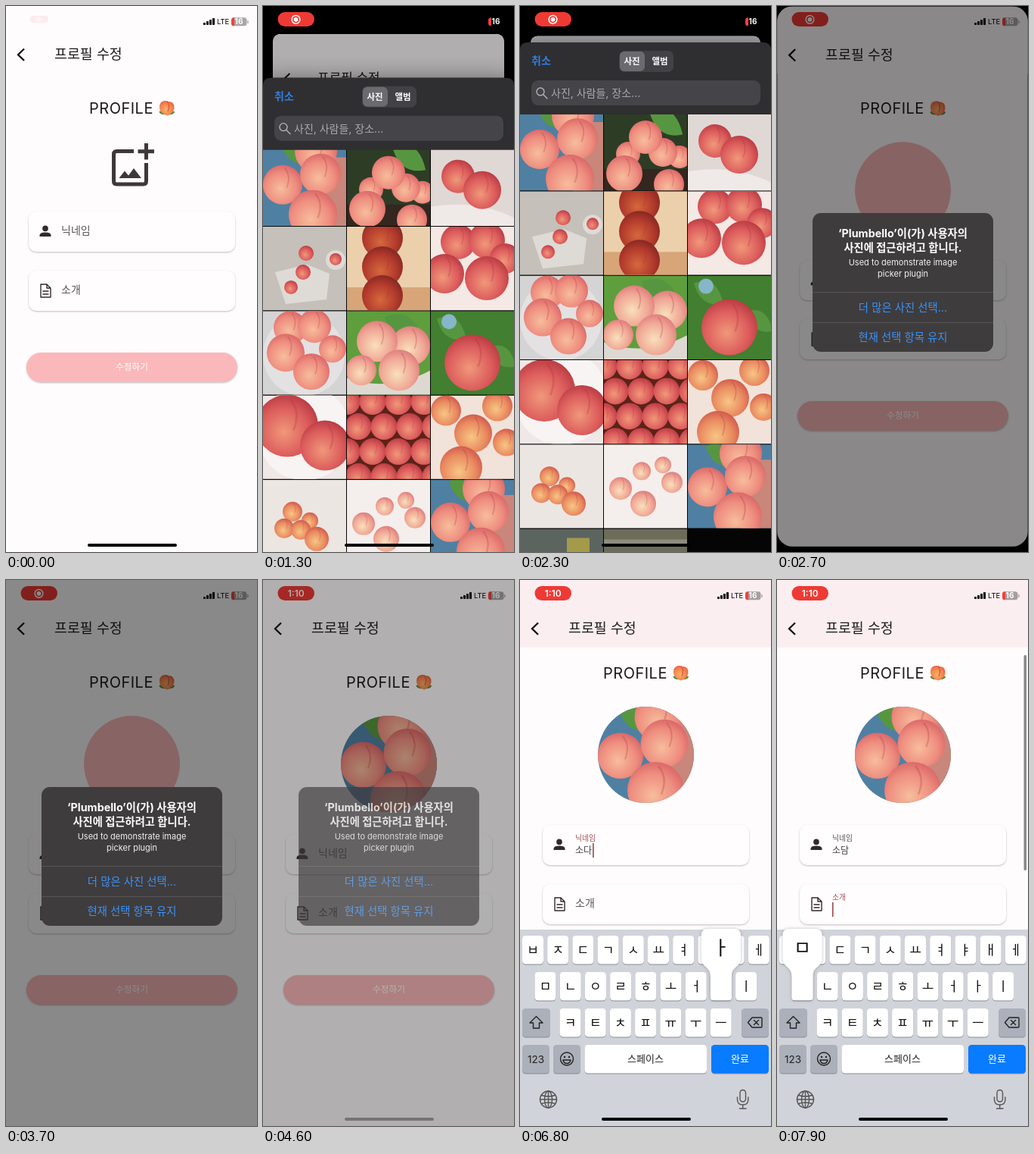
An HTML page that plays this animation: 332x720 px, repeating every 8000 ms.

```html
<!DOCTYPE html>
<html lang="ko">
<head>
<meta charset="utf-8">
<title>프로필 수정</title>
<style>
  html, body { margin: 0; width: 100%; height: 100%; overflow: hidden; background: #000; }
  svg { display: block; font-family: Inter, "Noto Sans CJK KR", "Noto Sans CJK", sans-serif; }
  .field { filter: drop-shadow(0 1px 1px rgba(0, 0, 0, .25)); }
  .mid { text-anchor: middle; }
  .line { fill: none; stroke: #222; stroke-width: 1.4; stroke-linecap: round; stroke-linejoin: round; }
</style>
</head>
<body>
<svg id="stage" width="100%" height="100%" viewBox="0 0 332 720"></svg>
<script>
const LOOP = 8000;
const $ = id => document.getElementById(id);
const range = n => [...Array(n).keys()];
const set = (id, attrs) => { for (const k in attrs) $(id).setAttribute(k, attrs[k]); };
const show = (id, v) => set(id, { opacity: Number(v) });
const ramp = (t, a, b) => Math.min(1, Math.max(0, (t - a) / (b - a)));
const ease = x => x * x * (3 - 2 * x);
const mix = (a, b, p) => a + (b - a) * p;
// critically damped spring from 0 to 1
const spring = (t, start) => {
  const w = Math.max(0, t - start) * .018;
  return 1 - (1 + w) * Math.exp(-w);
};

const rect = (x, y, w, h, fill, r = 0, more = '') =>
  `<rect x="${x}" y="${y}" width="${w}" height="${h}" rx="${r}" fill="${fill}" ${more}/>`;
const text = (s, x, y, size, fill, more = '') =>
  `<text x="${x}" y="${y}" font-size="${size}" fill="${fill}" ${more}>${s}</text>`;
const mid = (s, x, y, size, fill, more = '') => text(s, x, y, size, fill, 'class="mid" ' + more);
const path = (d, more = 'class="line"') => `<path d="${d}" ${more}/>`;
const disc = (x, y, r, fill, more = '') => `<circle cx="${x}" cy="${y}" r="${r}" fill="${fill}" ${more}/>`;
const gradient = (id, light, main, edge) => `<radialGradient id="${id}" cx=".45" cy=".6" r=".66">
  <stop stop-color="${light}"/><stop offset=".6" stop-color="${main}"/><stop offset="1" stop-color="${edge}"/></radialGradient>`;

// ---- photo grid ----
const peach = (kind, [x, y, r]) => disc(x, y, r, `url(#${kind})`) +
  path(`M${x + r * .1} ${y - r * .85}q${r * .35} ${r * .4} ${r * .1} ${r}`,
    `fill="none" stroke="#a52f3a" stroke-opacity=".25" stroke-width="${r * .07}"`);
const photo = (back, kind, peaches, extra = '') =>
  rect(0, 0, 111, 111, back) + extra + peaches.map(p => peach(kind, p)).join('');
const leaf = (x, y, s) => path(`M${x} ${y}q${s} ${-s * .4} ${s * 1.3} ${s * .9}q${-s} ${s * .2} ${-s * 1.3} ${-s * .9}`, 'fill="#579640"');

const photos = [
  photo('#4f80a2', 'pink', [[70, 12, 28], [26, 56, 26], [76, 42, 27], [66, 95, 32]],
    rect(70, 20, 41, 91, '#c9867a') + leaf(24, 2, 28)),
  photo('#2d3d25', 'pink', [[32, 62, 16], [100, 66, 15], [78, 60, 19], [55, 40, 22], [27, 88, 24], [86, 102, 20]],
    rect(0, 82, 111, 29, '#33271f') + leaf(60, 6, 34)),
  photo('#e0d8d5', 'red', [[36, 45, 22], [68, 63, 25]], path('M0 85Q60 75 111 100V111H0Z', 'fill="#efe9e8"')),
  photo('#c5c0b9', 'red', [[57, 35, 10], [53, 60, 10], [37, 80, 9], [96, 43, 8]],
    path('M16 60L58 50L88 62L84 96L30 102Z', 'fill="#dedbd6"') + disc(96, 44, 13, '#dedbd7')),
  photo('#ecd0ac', 'deep', range(3).map(i => [47, 15 + 38 * i, 27]), rect(0, 80, 111, 31, '#d8a578')),
  photo('#f4e9e5', 'red', [[36, 20, 23], [74, 18, 24], [98, 42, 20], [18, 62, 26], [74, 68, 29]]),
  photo('#d5d4d5', 'pink', [[36, 22, 22], [68, 20, 22], [92, 50, 18], [30, 55, 25], [64, 80, 24]], disc(54, 58, 54, '#e3e1e2')),
  photo('#5f9e3c', 'pale', [[84, 46, 26], [40, 40, 27], [19, 78, 20], [69, 78, 27]],
    path('M0 88Q55 108 111 78V111H0Z', 'fill="#ddd9d2"') + leaf(50, 8, 40)),
  photo('#427f30', 'red', [[55, 68, 37]], leaf(8, 10, 30) + leaf(76, 48, 28) + disc(24, 14, 10, '#85b7c9')),
  photo('#efe8e7', 'red', [[32, 40, 41], [82, 66, 33]], disc(55, 50, 62, '#f8f4f3')),
  photo('#5b2318', 'red', range(16).map(i => [(i % 4) * 34 + (i >> 2) % 2 * 15, (i >> 2) * 33 + 8, 17.5])),
  photo('#f1e3da', 'gold', [[20, 20, 20], [88, 14, 20], [100, 62, 18], [56, 50, 25], [40, 95, 28]]),
  photo('#ece6e2', 'gold', [[39, 42, 13], [28, 64, 13], [62, 54, 11], [50, 66, 13], [71, 78, 16]]),
  photo('#f4efec', 'pale', [[78, 27, 11], [90, 50, 14], [50, 35, 12], [22, 58, 15], [52, 78, 17]])
];
photos.push(photos[0],
  photo('#5c6460', 'gold', [], rect(62, 12, 30, 30, '#a39a4a')),
  photo('#6d6c58', 'gold', [], rect(0, 14, 111, 9, '#8f8d80')));
const cells = photos.map((p, i) =>
  `<svg x="${i % 3 * 111}" y="${85 + Math.floor(i / 3) * 111.3}" width="110" height="110.3">${p}</svg>`).join('');

// ---- profile page ----
const field = (id, label, dy, icon) => `<g transform="translate(0 ${dy})">
  ${rect(30, 271, 273, 53, '#fffdfe', 10, 'class="field"')}${icon}
  ${text(label, 73, 301, 14, '#555', `id="${id}Label"`)}
  ${text('', 73, 309, 12, '#444', `id="${id}Value"`)}
  ${rect(73, 295, 1.6, 19, '#9c4a4c', 0, `id="${id}Caret"`)}</g>`;
const person = disc(52, 293.4, 3.8, '#33282b') + path('M44.5 304v-1.5q0-4 7.5-4t7.5 4v1.5z', 'fill="#33282b"');
const sheetIcon = path('M46 289h8l5 5v12h-13zM54 289v5h5M49 298h7M49 302h7', 'class="line" style="stroke:#33282b"');
const addPhoto =
  path('M169 191.5H146.5q-4 0-4 4V231q0 4 4 4H181.5q4 0 4-4V207', 'fill="none" stroke="#3d383a" stroke-width="5"') +
  path('M185.5 181v21.5M174.5 191.7h21.5', 'fill="none" stroke="#3d383a" stroke-width="5"') +
  path('M149.5 227l7.5-9.5 5 6 7-9.5 10 13z', 'fill="#3d383a"');
const peachIcon = path('M213 143q-10 1-10.500-4q4-2 10.500 4q4-6 10-4q0 5-10 4z', 'fill="#4f8f3c"') +
  path('M213.500 144.500q-10.500-3-10.500-11q0-8.500 8-8.500q2.500 0 4 1q7.500 0 7.500 8q0 7-9 10.500z', 'fill="url(#orange)"') +
  path('M213 126q4.500 5 1 13', 'fill="none" stroke="#c9483a"');

const page = `<g id="page" clip-path="url(#cardClip)">
  ${rect(0, 0, 332, 720, '#fffcfd')}
  <g id="body">
    ${text('PROFILE', 110, 142, 20, '#1d1a1b', 'letter-spacing=".5"')}${peachIcon}
    <g id="add">${addPhoto}</g>
    ${disc(166.5, 242.5, 63.5, '#fbb8ba', 'id="blank"')}
    <g id="picked" clip-path="url(#avatar)"><g transform="translate(102.5 178.5) scale(1.165)">${photos[0]}</g></g>
    <g id="lower">
      ${field('name', '닉네임', 0, person)}${field('intro', '소개', 78, sheetIcon)}
      ${rect(27, 457, 279, 39, '#fbb8ba', 19.5, 'class="field"')}
      ${mid('수정하기', 166.5, 480, 11.7, '#fff')}
    </g>
  </g>
  ${rect(0, 0, 332, 89, '#fffcfd')}${rect(0, 0, 332, 89, '#fbeef1', 0, 'id="tint"')}
  ${path('M24 56.5L16 64.3L24 72', 'fill="none" stroke="#111" stroke-width="2.3"')}
  ${text('프로필 수정', 64, 70, 18.4, '#1d1a1b')}
  ${rect(326.5, 99, 3.5, 284, '#8b888a', 1.7, 'id="scrollbar"')}
  ${rect(0, 0, 332, 720, '#000', 0, 'id="shade"')}</g>`;

const picker = `<g id="picker">
  ${rect(0, 0, 332, 900, '#050505', 10, 'style="filter:drop-shadow(0 0 14px rgba(0,0,0,.4))"')}${cells}
  ${path('M0 95V10Q0 0 10 0H322Q332 0 332 10V95Z', 'fill="#2f2e31"')}
  ${text('취소', 15, 29, 14, '#2f7fe0', 'font-weight="700"')}
  ${rect(131, 11, 72, 28, '#424145', 7)}${rect(132, 12, 33, 26, '#6b6a6f', 6)}
  ${mid('사진', 148, 29, 11.5, '#fff', 'font-weight="700"')}${mid('앨범', 185, 29, 11.5, '#fff', 'font-weight="700"')}
  ${rect(15, 50, 303, 33, '#454448', 9)}
  <g class="line" style="stroke:#b5b4b9">${disc(27, 65, 5, 'none')}${path('M31 69l5 5', '')}</g>
  ${text('사진, 사람들, 장소...', 41, 72, 14, '#a9a8ad')}</g>`;

// ---- system chrome ----
const status = `<g id="pill">${rect(19.5, 8, 48.5, 19, '#ee3a34', 9.5)}
    <g id="recIcon">${disc(43.5, 17.8, 5.4, 'none', 'stroke="#fff" stroke-width="1.5"')}${disc(43.5, 17.8, 2.9, '#fff')}</g>
    ${mid('1:10', 43.7, 22, 12, '#fff', 'id="clock" font-weight="600"')}</g>
  ${range(4).map(i => rect(261 + i * 4, 22 - i * 2, 3, 3 + i * 2, '#000', .8)).join('')}
  ${text('LTE', 279, 24.3, 9.5, '#000')}
  ${rect(298, 15.2, 20.5, 11, 'rgba(0,0,0,.34)', 3.5)}${rect(319.3, 19, 1.3, 4, 'rgba(0,0,0,.34)', .6)}
  ${path('M302 15.2h-.5q-3.5 0-3.5 3.5v4q0 3.5 3.5 3.5h.5z', 'fill="#f0413c"')}
  ${mid('16', 308, 24.4, 10, '#fff', 'font-weight="700"')}`;

const link = (s, y) => mid(s, 166.5, y, 14.4, '#3b93f7');
const heading = (s, y) => mid(s, 166.5, y, 14.3, '#fff', 'font-weight="700"');
const dialog = `${rect(0, 0, 332, 720, '#000', 0, 'id="dim"')}<g id="dialog">
  ${rect(47, 273, 239, 183, '#3f3c3e', 11)}
  ${heading('‘Plumbello’이(가) 사용자의', 305)}${heading('사진에 접근하려고 합니다.', 324)}
  ${mid('Used to demonstrate image', 166.5, 342, 11, '#f2f1f2')}${mid('picker plugin', 166.5, 356.5, 11, '#f2f1f2')}
  ${rect(47, 377, 239, .8, '#5d5a5c')}${rect(47, 417, 239, .8, '#5d5a5c')}
  ${link('더 많은 사진 선택...', 403)}${link('현재 선택 항목 유지', 442)}</g>`;

// ---- keyboard ----
const rows = [['ㅂㅈㄷㄱㅅㅛㅕㅑㅐㅔ', 3, 469], ['ㅁㄴㅇㄹㅎㅗㅓㅏㅣ', 19.5, 517], ['ㅋㅌㅊㅍㅠㅜㅡ', 52.5, 565]];
const keys = {};
const key = (x, y, w, fill = '#fff') => rect(x, y + 1, w, 37.5, '#898b91', 4.5) + rect(x, y, w, 37.5, fill, 4.5);
const letters = rows.map(([chars, x0, y]) => [...chars].map((c, i) => {
  const x = x0 + i * 33.2;
  keys[c] = [x + 14, y];
  return key(x, y, 28) + mid(c, x + 14, y + 25, 17, '#111');
}).join('')).join('');
const keyboard = `<g id="keyboard">${rect(0, 461, 332, 300, '#d1d3da')}${letters}
  ${key(3, 565, 37, '#abb0ba')}${path('M21.5 575.5l8.5 8.5h-4.5v7h-8v-7h-4.5z')}
  ${key(293, 565, 36, '#abb0ba')}${path('M307 577h12q1 0 1 1v11q0 1-1 1h-12l-5.5-6.5zM309.5 580.5l6 6M315.5 580.5l-6 6')}
  ${key(3, 613, 36, '#abb0ba')}${mid('123', 21, 637, 13.5, '#222')}
  ${key(44, 613, 36, '#abb0ba')}${disc(62, 631.5, 8.5, 'none', 'class="line"')}
  ${disc(59, 629, 1.2, '#222')}${disc(65, 629, 1.2, '#222')}${path('M57 633h10q-1 4.5-5 4.5t-5-4.5z')}
  ${key(85.5, 613, 161.5)}${mid('스페이스', 166, 636, 13, '#222')}
  ${key(253, 613, 76, '#087bff')}${mid('완료', 291, 636, 13, '#fff')}
  <g style="stroke:#555" class="line">${disc(37.5, 685, 11, 'none')}
    <ellipse cx="37.5" cy="685" rx="5" ry="11"/>
    ${path('M26.5 685h22M37.5 674v22M28.5 679.5q9 3 18 0M28.5 690.5q9-3 18 0', '')}
    ${rect(291, 672.5, 7.5, 15.5, 'none', 3.7)}${path('M287.5 682v3q0 7 7.2 7t7.2-7v-3M294.7 692v5M290.5 697h8.5', '')}</g></g>
  <g id="popup">${path('M-26-49q0-8 8-8h36q8 0 8 8v32c0 10-12 10-12 22v29q0 3-3 3h-22q-3 0-3-3v-29c0-12-12-12-12-22z',
    'fill="#fff" style="filter:drop-shadow(0 0 2px rgba(0,0,0,.25))"')}${mid('', 0, -23, 25, '#111', 'id="popChar"')}</g>`;

$('stage').innerHTML = `<defs>
  ${gradient('pink', '#f7bd9c', '#ee8d7f', '#d65f62')}${gradient('red', '#f0987a', '#dc5c5c', '#b2343d')}
  ${gradient('deep', '#d5683c', '#b23a2c', '#7c2320')}${gradient('pale', '#f9e0bc', '#f0a795', '#dc7378')}
  ${gradient('gold', '#f7c684', '#e98a60', '#cb4f48')}${gradient('orange', '#ffb066', '#f58450', '#e0603f')}
  <clipPath id="avatar">${disc(166.5, 242.5, 63.5, '#000')}</clipPath>
  <clipPath id="cardClip">${rect(0, 0, 332, 720, '#000', 0, 'id="card"')}</clipPath></defs>
  ${page}${picker}${status}${keyboard}
  ${rect(108, 709, 118, 4, '#000', 2, 'id="homeBar"')}${dialog}`;

// [press time, key, nickname afterwards]
const strokes = [[6000, 'ㅅ', 'ㅅ'], [6250, 'ㅗ', '소'], [6500, 'ㄷ', '솓'], [6750, 'ㅏ', '소다'], [7000, 'ㅁ', '소담'], [7850, 'ㅁ', '소담']];
const INTRO_TAP = 7350;

function drawField(id, t, focusAt, blurAt, value) {
  const p = ease(ramp(t, focusAt, focusAt + 180)), focused = t >= focusAt && t < blurAt;
  set(id + 'Label', { y: mix(301, 291.5, p), 'font-size': mix(14, 9.8, p), fill: focused ? '#a04c50' : '#555' });
  $(id + 'Value').textContent = value;
  show(id + 'Caret', focused);
  set(id + 'Caret', { x: 73 + (value ? $(id + 'Value').getComputedTextLength() + 1 : 0) });
}

function draw(t) {
  const up = t < 2360 ? spring(t, 1055) : 1 - spring(t, 2360);
  const carded = up > .004;
  const grow = ease(ramp(t, -60, 300));
  const chosen = t >= 2300;

  set('pill', { transform: `translate(43.7 17.5) scale(${mix(.47, 1, grow)}) translate(-43.7 -17.5)`, opacity: grow });
  show('recIcon', t < 3900);
  show('clock', t >= 3900);

  set('page', { transform: `translate(${14.1 * up} ${39.5 * up}) scale(${1 - .085 * up})` });
  set('card', { height: carded ? 713 : 720, rx: carded ? mix(20, 10, up) : 0 });
  show('shade', .33 * up);
  set('picker', { transform: `translate(0 ${mix(768, 48, up)})` });

  show('add', !chosen);
  show('blank', chosen && t < 4000);
  show('picked', t >= 4000);
  set('lower', { transform: `translate(0 ${chosen ? 64 : 0})` });

  const alert = ramp(t, 2420, 2640) * (1 - ramp(t, 4500, 4800));
  show('dialog', alert);
  show('dim', .46 * alert);
  show('homeBar', 1 - alert);

  const scroll = ease(ramp(t, 5750, 5950));
  set('body', { transform: `translate(0 ${-12 * scroll})` });
  show('tint', scroll);
  show('scrollbar', ramp(t, 5750, 5850) - ramp(t, 6600, 6800) + ramp(t, 7400, 7500));

  const last = strokes.filter(s => s[0] <= t).pop();
  drawField('name', t, 5200, INTRO_TAP, last ? last[2] : '');
  drawField('intro', t, INTRO_TAP, LOOP, '');

  set('keyboard', { transform: `translate(0 ${260 * (1 - spring(t, 5220))})` });
  const pressed = Boolean(last) && t < last[0] + 130;
  show('popup', pressed);
  if (pressed) {
    set('popup', { transform: `translate(${keys[last[1]]})` });
    $('popChar').textContent = last[1];
  }
}

const start = performance.now();
function tick() {
  draw((performance.now() - start) % LOOP);
  requestAnimationFrame(tick);
}
tick();
</script>
</body>
</html>
```
